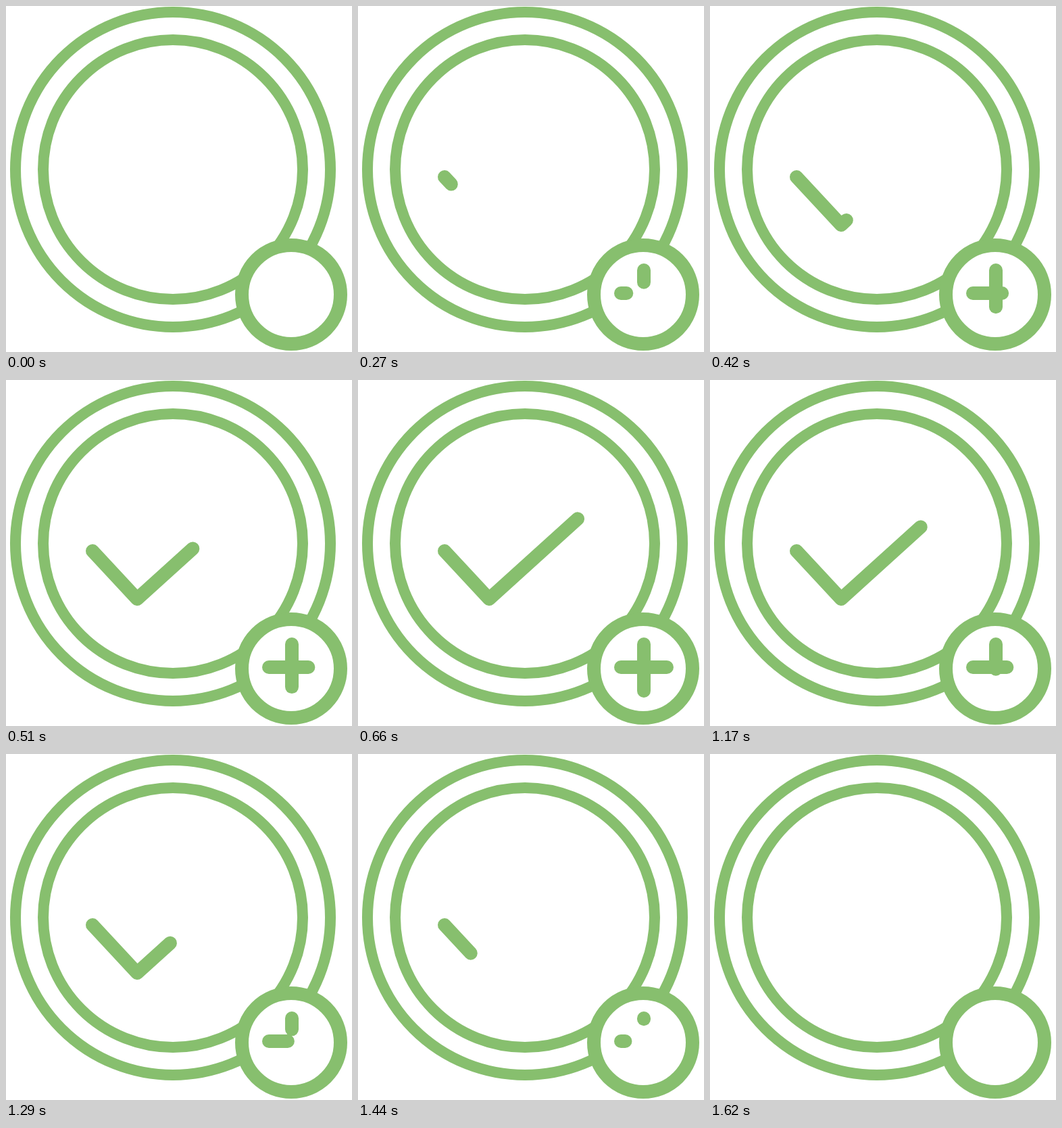
Write an HTML page with a canvas that moves like this. It is 512x512 px and loops after 1.65 s.

```html
<!DOCTYPE html>
<html lang="en">
<head>
<meta charset="utf-8">
<title>Check and plus</title>
<style>
  html, body { margin: 0; width: 100%; height: 100%; overflow: hidden; background: #fff; }
  canvas { display: block; width: 512px; height: 512px; }
</style>
</head>
<body>
<canvas id="stage" width="512" height="512"></canvas>
<script>
const ctx = document.getElementById('stage').getContext('2d');
const LOOP = 1650, STEP = 30;
const GROW = 780, SHRINK = 540;
const GREEN = '#87bf6e';

// Strokes start one after another, both when growing and when shrinking.
const strokes = [
  { points: [[423, 391], [423, 461]], growAt: 0, shrinkAt: 950 },
  { points: [[389, 425], [459.5, 425]], growAt: 60, shrinkAt: 1020 },
  { points: [[128, 253], [194, 324], [341, 191]], growAt: 120, shrinkAt: 1080 }
];

// Cubic Bezier easing whose control points lie at y = 0 and y = 1.
function easing(x1, x2) {
  return x => {
    if (x <= 0) return 0;
    if (x >= 1) return 1;
    let low = 0, high = 1;
    for (let i = 0; i < 30; i++) {
      const s = (low + high) / 2, r = 1 - s;
      if (3 * r * r * s * x1 + 3 * r * s * s * x2 + s * s * s < x) low = s;
      else high = s;
    }
    return low * low * (3 - 2 * low);
  };
}
const easeGrow = easing(0.6, 0.2);
const easeShrink = easing(0.2, 0.6);

function pathLength(points) {
  return points.slice(1).reduce((sum, [x, y], i) =>
    sum + Math.hypot(x - points[i][0], y - points[i][1]), 0);
}

function ring(x, y, radius, width) {
  ctx.beginPath();
  ctx.arc(x, y, radius, 0, Math.PI * 2);
  ctx.lineWidth = width;
  ctx.stroke();
}

function drawStroke({ points, growAt, shrinkAt }, time) {
  const part = easeGrow((time - growAt) / GROW) - easeShrink((time - shrinkAt) / SHRINK);
  if (part <= 0) return;
  const length = pathLength(points);
  ctx.setLineDash(part < 1 ? [Math.max(part * length, 0.1), length * 2] : []);
  ctx.beginPath();
  points.forEach(([x, y]) => ctx.lineTo(x, y));
  ctx.lineWidth = 20;
  ctx.stroke();
  ctx.setLineDash([]);
}

function draw(time) {
  ctx.fillStyle = '#fff';
  ctx.fillRect(0, 0, 512, 512);
  ctx.strokeStyle = GREEN;
  ctx.lineCap = ctx.lineJoin = 'round';
  ring(247, 242, 233, 16);
  ring(247, 242, 192, 16);
  ctx.beginPath();
  ctx.arc(422, 427, 73, 0, Math.PI * 2);
  ctx.fill();
  ring(422, 427, 73, 20);
  strokes.forEach(stroke => drawStroke(stroke, time));
}

const start = performance.now();
function tick() {
  const time = (performance.now() - start + 1) % LOOP;
  draw(Math.floor(time / STEP) * STEP);
  requestAnimationFrame(tick);
}
tick();
</script>
</body>
</html>
```
